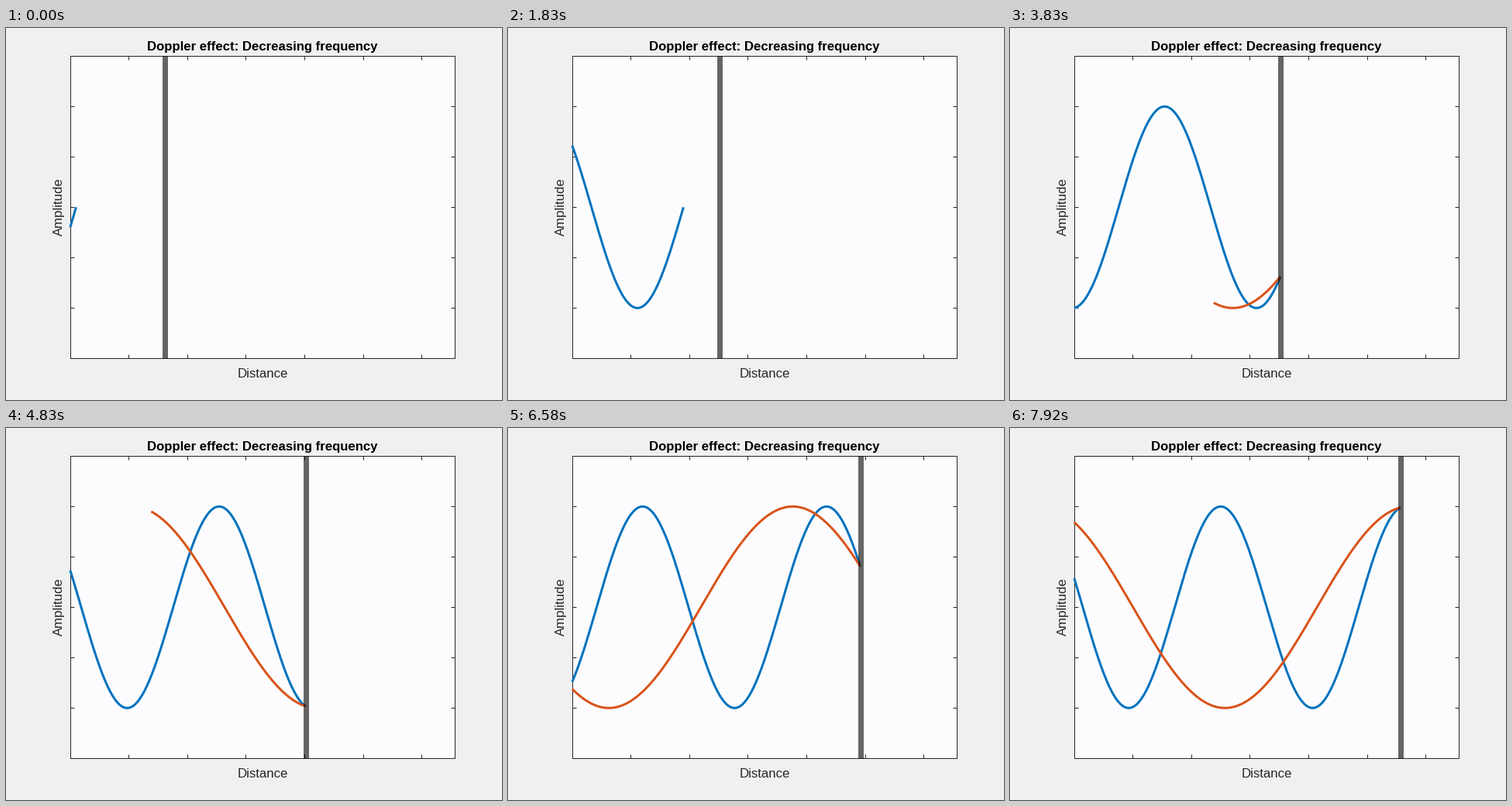
These frames come from a looping animation (640x480 px, 8 s). A matplotlib script:

```python
import numpy as np
import matplotlib.pyplot as plt
from matplotlib.animation import FuncAnimation

W, H, DPI = 640, 480, 100
LOOP, TICK = 8000, 20            # ms
PAPER, PANEL, INK = "#f0f0f0", "#fcfcfe", "#262626"
LEFT, RIGHT, TOP, BOTTOM = 82.85, 579.1, 36.3, 426.3   # plot box, px from top left
UNIT = 75.54                     # px per x unit
FONT = "Liberation Sans"


def px(n):
    """Pixels to points."""
    return n * 72 / DPI


fig = plt.figure(figsize=(W / DPI, H / DPI), dpi=DPI, facecolor=PAPER)
ax = fig.add_axes([LEFT / W, 1 - BOTTOM / H, (RIGHT - LEFT) / W, (BOTTOM - TOP) / H],
                  facecolor=PANEL)
ax.set_xlim(0, (RIGHT - LEFT) / UNIT)
ax.set_ylim(-1.5, 1.5)
ax.set_xticks(range(7))
ax.set_yticks(np.arange(-1.5, 1.6, 0.5))
ax.tick_params(direction="in", top=True, right=True, length=px(5), width=px(1),
               color=INK, labelbottom=False, labelleft=False)
for spine in ax.spines.values():
    spine.set(linewidth=px(1), edgecolor=INK)


def label(x, y, text, color=INK, **style):
    fig.text(x / W, 1 - y / H, text, family=FONT, size=px(16.72), color=color,
             ha="center", va="baseline", rotation_mode="anchor", **style)


label(331, 28.5, "Doppler effect: Decreasing frequency", "black", weight="bold")
label(331.5, 451, "Distance")
label(73, 231, "Amplitude", rotation=90)


def curve(color, width, z, **style):
    return ax.plot([], [], color=color, lw=px(width), zorder=z, clip_on=False,
                   solid_capstyle="butt", **style)[0]


incident = curve("#0072bd", 3, 3)
reflected = curve("#d95319", 3, 4)
wall = curve("black", 7, 5, alpha=0.6)


def step_at(ms):
    """Ten motion steps per second, shown on a twelve per second clock."""
    slot = int((ms + 14) * 12 / 1000)
    return (10 * slot + 5) // 12 + 1


def draw(i):
    n = step_at(i * TICK)
    wall_x = np.pi / 2 + 0.05 * n
    front = 0.1 * n

    x = np.linspace(0, min(front, wall_x), 200)
    incident.set_data(x, np.sin(2 * (x - front)))

    if front > wall_x:
        x = np.linspace(max(0, 2 * np.pi - front), wall_x, 200)
        reflected.set_data(x, np.cos(x - 0.15 * n))
    else:
        reflected.set_data([], [])

    wall.set_data([wall_x, wall_x], [-1.5, 1.5])
    return incident, reflected, wall


anim = FuncAnimation(fig, draw, frames=LOOP // TICK, interval=TICK,
                     init_func=lambda: draw(0), repeat=True, repeat_delay=0)
plt.show()
```
